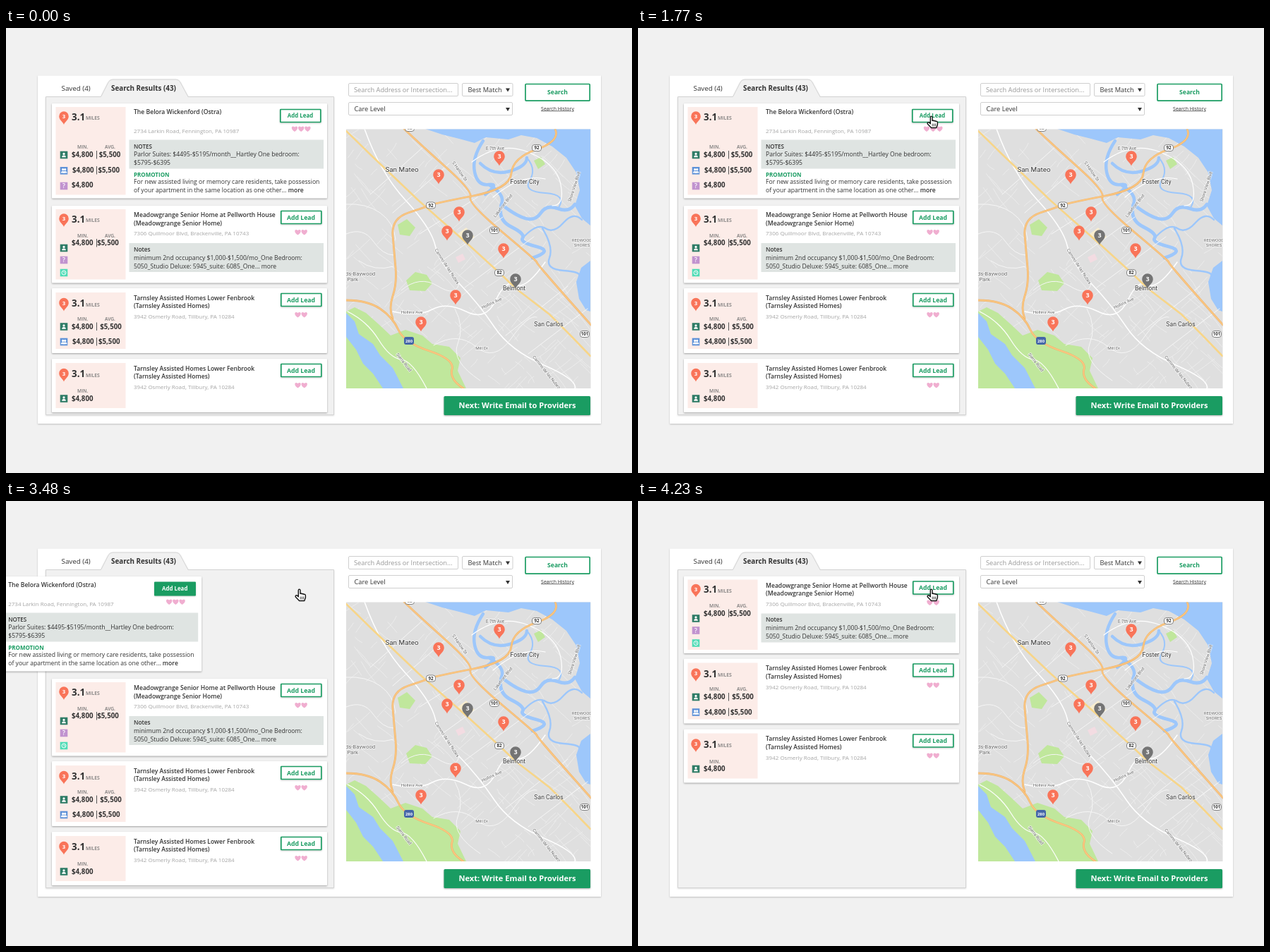
These frames come from a looping animation (887 by 631 pixels, 4.26 s). An HTML page:

```html
<!DOCTYPE html>
<html lang="en">
<head>
<meta charset="utf-8">
<title>Search results</title>
<style>
  html, body { margin: 0; width: 100%; height: 100%; overflow: hidden; background: #f1f1f1; }
  svg { display: block; width: 887px; height: 631px; font-family: "Open Sans", sans-serif; fill: #333; }
  text { white-space: pre; }
  .b { font-weight: 700; }
  .s { font-weight: 600; }
  .mid { text-anchor: middle; }
  .map { font-family: Roboto, sans-serif; stroke: #fff; stroke-width: 1.6px; stroke-opacity: .75; paint-order: stroke; }
  .card { filter: drop-shadow(0 1px 1.2px #0005); }
  .line { fill: none; stroke-linecap: round; stroke-linejoin: round; }
</style>
</head>
<body>
<svg id="stage" viewBox="0 0 887 631"></svg>
<script>
const GREEN = '#1a9c62', ORANGE = '#f97459', GREY = '#747474', WATER = '#9dc7fb', PARK = '#c0e79c';
const LEAF = '#2f7c66', BLUE = '#5f92d8', PURPLE = '#c193cf', TEAL = '#4fdcb6';

// y is the middle of the capitals
const text = (x, y, size, str, attr = '') =>
  `<text x="${x}" y="${y + size * .36}" font-size="${size}" ${attr}>${str}</text>`;
const rect = (x, y, w, h, fill, attr = '') =>
  `<rect x="${x}" y="${y}" width="${w}" height="${h}" fill="${fill}" ${attr}/>`;
const path = (d, fill, attr = '') => `<path d="${d}" fill="${fill}" ${attr}/>`;
const line = (d, color, width) =>
  `<path class="line" d="${d}" stroke="${color}" stroke-width="${width}"/>`;
const group = (x, y, body, scale = 1) =>
  `<g transform="translate(${x} ${y}) scale(${scale})">${body}</g>`;

const pin = (x, y, color = ORANGE, scale = 1) => group(x, y,
  path('M0 12.5C-1.5 8-7.8 5-7.8-1A7.8 7.8 0 0 1 7.8-1C7.8 5 1.5 8 0 12.5Z', color) +
  text(0, -.8, 9, 3, 'class="b mid" fill="#fff"'), scale);

const hearts = (x, y, n) => Array.from({ length: n }, (_, i) =>
  group(x + i * 9.2, y, path('M0 4C-7-.5-4-6 0-2.4C4-6 7-.5 0 4Z', '#f0aed0'))).join('');

const person = x => `<circle cx="${x}" cy="-1.6" r="1.6" fill="#fff"/>` +
  path(`M${x - 2.8} 3.2Q${x - 2.8} .6 ${x} .6T${x + 2.8} 3.2Z`, '#fff');
const glyphs = {
  [LEAF]: person(0),
  [BLUE]: person(-1.4) + person(1.7),
  [PURPLE]: text(0, 0, 8.5, '?', 'class="s mid" fill="#fff"'),
  [TEAL]: '<circle r="3" fill="none" stroke="#fff"/>' + line('M0-1.5V.3H1.4', '#fff', .8),
};
const icon = (y, color) => group(82, y, rect(-5.3, -5.3, 10.6, 10.6, color) + glyphs[color]);

const price = (y, x, x2) => text(x, y, 9.7, '$4,800', 'class="b"') + (x2
  ? rect(128, y - 6, 1, 11.5, '#555') + text(x2, y, 9.7, '$5,500', 'class="b"') : '');
const heads = (y, avg) => text(101, y, 6.7, 'MIN.', 'class="s" fill="#777"') +
  (avg ? text(140, y, 6.7, 'AVG.', 'class="s" fill="#777"') : '');

const button = (x, y, size, hot) =>
  rect(x + .8, y - 9, 57, 18, '#fff', `stroke="${GREEN}" stroke-width="1.7" rx=".5" style="filter:drop-shadow(0 1px 1px #0003)"`) +
  text(x + 29, y, size, 'Add Lead', `class="b mid" fill="${GREEN}"`) +
  (hot ? `<g id="hot">${rect(x, y - 9.8, 58.6, 19.7, GREEN)}${text(x + 29, y, size, 'Add Lead', 'class="b mid" fill="#fff"')}</g>` : '');

const card = (y, h, pinkY, pinkH, pinY, body) =>
  rect(65, y, 390, h, '#fff', 'class="card" rx="1"') + rect(70.5, pinkY, 99, pinkH, '#fcece8') +
  pin(82, pinY, ORANGE, .87) + text(93, pinY, 13.4, '3.1', 'class="b"') +
  text(113, pinY + 1.6, 6.9, 'MILES', 'class="s" fill="#777"') + body;
const title = (y, str) => text(181, y, 8.6, str, 'class="s"');
const address = (y, str) => text(181, y, 8, str, 'fill="#a5a5a5"');
const copy = (y, str) => text(181, y, 8.62, str);
const notes = (y, h) => rect(174.5, y, 275.5, h, '#dfe4e2');

const firstCard = card(107, 134.5, 112, 124.5, 126,
  heads(169, 1) + icon(180, LEAF) + price(180, 93, 131.8) + icon(202.3, BLUE) + price(202, 94, 130.5) +
  icon(224, PURPLE) + price(223, 93) +
  title(119, 'The Belora Wickenford (Ostra)') + address(146, '2734 Larkin Road, Fennington, PA 10987') +
  notes(158.5, 41) + text(181, 168, 8.1, 'NOTES', 'class="s"') +
  copy(179.3, 'Parlor Suites: $4495-$5195/month__Hartley One bedroom:') + copy(190.8, '$5795-$6395') +
  text(181, 207.7, 8, 'PROMOTION', `class="b" fill="${GREEN}"`) +
  copy(217.6, 'For new assisted living or memory care residents, take possession') +
  copy(229.5, 'of your apartment in the same location as one other... <tspan class="s">more</tspan>') +
  hearts(409, 143, 3) + button(388, 124.5, 7.9, true));

const twinCard = (y, h, pinkH, body) => card(y, h, y + 6, pinkH, y + 21.5,
  title(y + 13.5, 'Tarnsley Assisted Homes Lower Fenbrook') + title(y + 25.3, '(Tarnsley Assisted Homes)') +
  address(y + 40.4, '3942 Osmerly Road, Tillbury, PA 10284') +
  hearts(413.5, y + 37.5, 2) + button(389, y + 16.5, 8.7) + body);

const otherCards = card(252, 109.5, 257, 99.5, 271,
  heads(294.5, 1) + price(305, 93, 129.3) + icon(312, LEAF) + icon(329, PURPLE) + icon(347, TEAL) +
  title(265, 'Meadowgrange Senior Home at Pellworth House') + title(276.5, '(Meadowgrange Senior Home)') +
  address(291.5, '7306 Quillmoor Blvd, Brackenville, PA 10743') +
  notes(305, 41) + text(181, 314, 8.3, 'Notes', 'class="s"') +
  copy(325.6, 'minimum 2nd occupancy $1,000-$1,500/mo_One Bedroom:') +
  copy(337.5, '5050_Studio Deluxe: 5945_suite: 6085_One... more') +
  hearts(413.5, 289.5, 2) + button(389, 268.5, 8.7)) +
  twinCard(369, 92, 80, heads(412.5, 1) + icon(423.5, LEAF) + price(423.5, 93, 133.3) +
    icon(445, BLUE) + price(445, 94, 131)) +
  twinCard(469, 76, 64, heads(515) + icon(525.5, LEAF) + price(525.5, 93));

// Side streets run along and across the shoreline
function streets() {
  let seed = 7, out = '';
  const rnd = () => (seed = seed * 16807 % 2147483647) / 2147483647;
  for (let i = 0; i < 230; i++) {
    const x = 482 + rnd() * 346, y = 143 + rnd() * 368, len = 10 + rnd() * 34;
    const a = .8 + (i % 2) * Math.PI / 2 + (rnd() - .5) * .35;
    const dx = Math.cos(a) * len, dy = Math.sin(a) * len, bend = (rnd() - .5) * 8;
    out += `M${x.toFixed(1)} ${y.toFixed(1)}q${(dx / 2 + bend).toFixed(1)} ${(dy / 2).toFixed(1)} ${dx.toFixed(1)} ${dy.toFixed(1)}`;
  }
  return line(out, '#efefef', .8);
}

const highway = d => line(d, '#f0b268', 2.8) + line(d, '#fbc985', 1.5);
const shield = (x, y, n) => rect(x - 6.5, y - 4.5, 13, 9, '#fff', 'rx="3.5" stroke="#666" stroke-width=".8"') +
  text(x, y, 6.2, n, 'class="b mid"');
const label = (x, y, size, str, turn = 0, attr = 'fill="#666"') =>
  text(x, y, size, str, `class="map mid" transform="rotate(${turn} ${x} ${y})" ${attr}`);
const city = (x, y, size, str) => label(x, y, size, str, 0, 'fill="#333"');

const map = `<clipPath id="mapBox">${rect(482, 143.5, 346.5, 367.5, '#000')}</clipPath><g clip-path="url(#mapBox)">` +
  rect(482, 143, 347, 369, '#dfdfdf') + streets() +
  path('M640 292L652 283L664 296L653 307Z', '#f8edcf') + path('M637 325L647 320L651 328L641 333Z', '#f3dce2') +
  path('M482 402L494 396L510 404L528 420L545 436L566 428L590 436L604 448L628 452L644 468L640 486L652 511H482Z', PARK) +
  path('M555 279L568 271L580 283L572 295L558 293Z', PARK) +
  path('M567 358L580 346L596 350L604 362L594 373L572 372Z', PARK) +
  path('M748 188L758 183L764 193L754 200Z', PARK) +
  path('M594 143L618 151L642 157L664 163L680 155L712 158L730 152L752 156L774 168L794 184L808 205L813 230L806 252L816 270L828 280V143Z', WATER) +
  path('M828 330L815 340L808 360L812 384L822 400L828 402Z', WATER) +
  path('M482 404L494 416L500 434L520 448L530 464L548 482L563 511H534L520 490L506 476L496 456L482 438Z', WATER) +
  line('M676 160Q660 184 664 204T684 222T679 236M672 192Q690 210 714 203T738 184M684 222Q708 236 702 250', WATER, 4.5) +
  line('M702 250Q722 266 736 270T758 262T782 256T806 250M702 250Q696 272 716 282T732 298T752 310T746 326', WATER, 4.8) +
  line('M732 298Q752 276 764 284T790 276T816 272M760 284Q776 310 770 326T790 344T812 352', WATER, 2.4) +
  line('M738 184Q752 200 742 216T764 234T782 256', WATER, 2) +
  line('M482 250Q510 248 530 262T552 300M500 330Q522 346 549 338M482 292Q506 282 520 302T549 322', '#f6f6f6', 1) +
  line('M508 143Q530 205 566 244T608 308T642 362T692 424T762 478T806 511', '#fff', 1.5) +
  line('M548 402Q584 410 604 399T652 402T694 386T722 364T764 332', '#fff', 1.5) +
  line('M606 450Q640 430 666 452T716 440T752 410M636 398Q650 424 640 448T672 500M560 372Q586 350 612 366T642 362', '#f6f6f6', 1) +
  line('M516 236L592 168M548 262L628 192M586 292L668 240M618 330L704 268M650 368L748 296M708 436L796 366M740 462L824 398', '#f6f6f6', 1) +
  line('M660 190Q700 160 740 176T786 222T774 252M690 240Q730 206 764 214', '#fff', 1.2) +
  line('M484 402Q512 416 528 442T560 470T596 511', '#fff', 1.2) +
  line('M482 146L520 183L585 245L654 306L699 347L722 369L770 406L800 436L828 465', '#f7d588', 2.6) +
  highway('M564 143Q586 164 624 198T658 240T704 290T752 332T796 384T828 420') +
  highway('M548 412Q542 398 548 380T552 340T548 294T570 262T602 251T662 238T716 206T752 172T778 143') +
  highway('M482 386Q512 386 530 398T556 428T600 458T632 484T648 511') +
  shield(602, 251.5, 92) + shield(752, 170, 92) + shield(692, 287, 101) + shield(699, 347, 82) +
  shield(820, 434, 101) + shield(572, 142, 82) +
  rect(564, 438, 14, 11, '#4566a8', 'rx="3"') + text(571, 443.5, 5.8, 280, 'class="b mid" fill="#fff"') +
  label(693, 171, 6.3, 'E 7th Ave') + label(643, 203, 6.3, 'S Harlow St', 55) +
  label(625, 338, 6.2, 'Camino de las Nubes', 57) + label(766, 488, 6.2, 'Camino de las Nubes', 51) +
  label(575, 402.5, 6.2, 'Hollins Ave') + label(688, 390, 6.2, 'Hollins Ave', -25) +
  label(674, 454, 6.2, 'Mill Dr') + label(564, 474, 6.2, 'Sierra Road', 52) +
  label(704, 252, 6.2, 'Lakefront Blvd', -52) + label(805, 225, 6.2, 'Shore View Blvd', -72) +
  label(816, 301, 6, 'REDWOOD') + label(816, 308, 6, 'SHORES') +
  label(502, 348.5, 7.8, 'ds-Baywood') + label(491, 356, 7.8, 'Park') +
  city(561, 200, 9.9, 'San Mateo') + city(735, 217.5, 8.6, 'Foster City') +
  city(720, 368.5, 8.6, 'Belmont') + city(769, 420, 8.6, 'San Carlos') +
  [[699, 183], [613, 209], [642, 262], [625, 289], [705, 314], [637, 380], [588, 418]].map(([x, y]) => pin(x, y)).join('') +
  pin(654, 295, GREY) + pin(722, 357, GREY) + '</g>';

const field = (x, y, w) => rect(x, y, w, 18, '#fff', 'rx="1.5" stroke="#cfcfcf"');
const arrow = (x, y) => path(`M${x - 3} ${y - 2}h6l-3 5Z`, '#333');

const page = rect(45, 67.5, 798, 493.5, '#fff', 'style="filter:drop-shadow(0 1px 1px #0003)"') +
  path('M56.5 97.5H134.5L145 77Q147 73 151 73H241Q245 73 247 77L258 97.5H464.5V548.5H56.5Z', '#f1f1f1',
    'stroke="#d3d3d3" style="filter:drop-shadow(0 1px 1px #0002)"') +
  text(78.5, 85, 9.8, 'Saved (4)') + text(149, 85, 9.85, 'Search Results (43)', 'class="b"') +
  field(485.5, 78.5, 155) + field(646.5, 78.5, 71.5) + field(485.5, 105.5, 232) +
  text(493, 88, 9.27, 'Search Address or Intersection...', 'fill="#999"') +
  text(654.5, 88, 9.25, 'Best Match') + arrow(711, 87.5) + text(493.5, 115, 9.25, 'Care Level') + arrow(711, 115) +
  rect(736, 79.5, 91.2, 23.6, '#fff', `stroke="${GREEN}" stroke-width="1.7" rx="1"`) +
  text(781.5, 90.5, 8.6, 'Search', `class="b mid" fill="${GREEN}"`) +
  text(781.5, 114, 6.95, 'Search History', 'class="mid" text-decoration="underline"') + map +
  rect(620.5, 522, 207.5, 27, GREEN, 'rx="1.5" style="filter:drop-shadow(0 1px 1px #0005)"') +
  text(724.5, 535.5, 11.1, 'Next: Write Email to Providers', 'class="b mid" fill="#fff"');

const hand = group(409, 124.5,
  path('M5.3 11.2V2.2Q5.3.6 6.6.6T8 2.2V7Q9.3 6 10.4 7.3Q11.8 6.5 12.8 7.9Q15.4 7.2 15.4 10V12.5L13.8 17H6.6L1.5 11.8Q.6 10 2 9.4T5.3 11.2Z',
    '#fff', 'stroke="#111" stroke-width="1.4" stroke-linejoin="round"') +
  line('M8.2 11.5V14.5M10.4 11.5V14.5M12.6 11.5V14.5', '#111', .8));

const stage = document.getElementById('stage');
stage.innerHTML = page + `<g id="others">${otherCards}</g><g id="first">${firstCard}</g><g id="cursor">${hand}</g>`;
const [others, first, cursor, hot] = ['others', 'first', 'cursor', 'hot'].map(id => document.getElementById(id));

const LOOP = 4260;
const ease = u => u < .5 ? 2 * u * u : 1 - 2 * (1 - u) ** 2;
const move = (el, x, y) => el.setAttribute('transform', `translate(${x} ${y})`);

function draw() {
  const t = performance.now() % LOOP;
  const part = (from, to) => ease(Math.min(1, Math.max(0, (t - from) / (to - from))));
  const away = 1 - part(960, 1560);
  move(cursor, -435 * away, 100 * away);
  hot.setAttribute('opacity', part(2760, 3160));
  move(first, -463 * part(3240, 3790), 0);
  move(others, 0, -145.5 * part(3740, 4175));
  requestAnimationFrame(draw);
}
draw();
</script>
</body>
</html>
```
